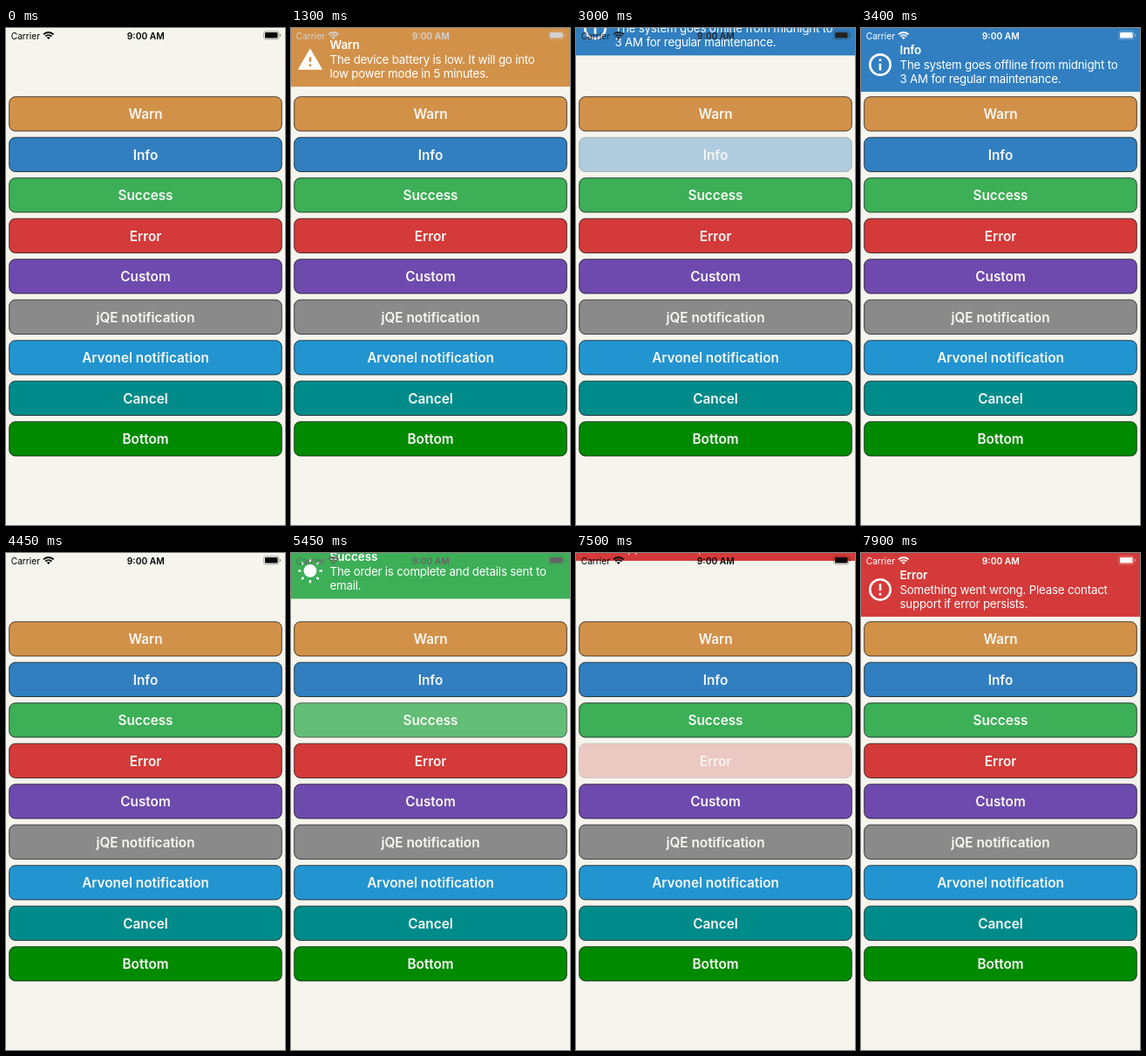
An HTML page with a canvas that plays this animation: 320 by 569 pixels, repeating every 8 s.

```html
<!DOCTYPE html>
<html lang="en">
<head>
<meta charset="utf-8">
<title>Dropdown alerts</title>
<style>
  html, body { margin: 0; width: 100%; height: 100%; overflow: hidden; background: #f5f5ee; }
  canvas { display: block; width: 320px; height: 569px; }
</style>
</head>
<body>
<canvas id="stage"></canvas>
<script>
const W = 320, H = 569, LOOP = 8000, BANNER_H = 73;
const BG = '#f5f5ee', FONT = 'Inter, "Liberation Sans", sans-serif';
const canvas = document.getElementById('stage');
const dpr = window.devicePixelRatio || 1;
canvas.width = W * dpr;
canvas.height = H * dpr;
const ctx = canvas.getContext('2d');

const buttons = [
  ['Warn', '#d29149'], ['Info', '#317fc0'], ['Success', '#3caf57'],
  ['Error', '#d33a39'], ['Custom', '#6e4aae'], ['jQE notification', '#8a8a8a'],
  ['Arvonel notification', '#2294d0'], ['Cancel', '#008b8b'], ['Bottom', '#008a00']
];

// Each alert belongs to the button with the same index; times in ms.
const alerts = [
  { press: 925, pressTime: 150, release: 1055, open: 1055, close: 2110, icon: warnIcon,
    lines: ['The device battery is low. It will go into', 'low power mode in 5 minutes.'] },
  { press: 2790, pressTime: 0, release: 2924, open: 2908, close: 4025, icon: infoIcon,
    lines: ['The system goes offline from midnight to', '3 AM for regular maintenance.'] },
  { press: 5140, pressTime: 0, release: 5290, open: 5295, close: 6150, icon: sunIcon,
    lines: ['The order is complete and details sent to', 'email.'] },
  { press: 7290, pressTime: 0, release: 7462, open: 7462, close: Infinity, icon: errorIcon,
    lines: ['Something went wrong. Please contact', 'support if error persists.'] }
];

const clamp = x => Math.max(0, Math.min(1, x));
const easeQuad = x => {
  x = clamp(x);
  return x < 0.5 ? 2 * x * x : 1 - 2 * (1 - x) ** 2;
};

// Damped spring from 0 to 1: stiffness 230.2, damping 28, mass 1.
function spring(ms) {
  if (ms <= 0) return 0;
  if (ms > 800) return 1;
  const t = ms / 1000, decay = 14, w = Math.sqrt(230.2 - decay * decay);
  return 1 - Math.exp(-decay * t) * (Math.cos(w * t) + decay / w * Math.sin(w * t));
}

function buttonOpacity(alert, t) {
  if (!alert || t < alert.press) return 1;
  const pressed = time => 1 - 0.8 * (alert.pressTime ? easeQuad((time - alert.press) / alert.pressTime) : 1);
  if (t < alert.release) return pressed(t);
  const from = pressed(alert.release);
  return from + (1 - from) * easeQuad((t - alert.release) / 250);
}

function text(str, x, y, size, weight, color, align = 'left', spacing = 0) {
  ctx.font = `${weight} ${size}px ${FONT}`;
  ctx.letterSpacing = spacing + 'px';
  ctx.textAlign = align;
  ctx.fillStyle = color;
  ctx.fillText(str, x, y);
}

function roundRect(x, y, w, h, r) {
  ctx.beginPath();
  ctx.roundRect(x, y, w, h, r);
}

function disc(x, y, r) {
  ctx.beginPath();
  ctx.arc(x, y, r, 0, Math.PI * 2);
}

function line(x1, y1, x2, y2) {
  ctx.beginPath();
  ctx.moveTo(x1, y1);
  ctx.lineTo(x2, y2);
  ctx.stroke();
}

function drawButton(i, t) {
  const [label, color] = buttons[i];
  const y = 78.4 + i * 46.5;
  roundRect(3.7, y + 0.3, 312.6, 39.3, 7);
  ctx.fillStyle = color;
  ctx.fill();
  ctx.strokeStyle = 'rgba(0,0,0,.85)';
  ctx.lineWidth = 0.8;
  ctx.stroke();
  text(label, 160, y + 25.8, 15.3, 600, '#f8f8f5', 'center');
  const opacity = buttonOpacity(alerts[i], t);
  if (opacity < 1) {
    ctx.globalAlpha = 1 - opacity;
    ctx.fillStyle = BG;
    ctx.fillRect(2, y - 1, 316, 42);
    ctx.globalAlpha = 1;
  }
}

function warnIcon(color) {
  ctx.beginPath();
  ctx.moveTo(22, 29);
  ctx.lineTo(36.2, 53.6);
  ctx.lineTo(7.8, 53.6);
  ctx.fill();
  ctx.fillStyle = color;
  ctx.fillRect(20.7, 39.2, 2.6, 5.4);
  ctx.fillRect(20.7, 47.2, 2.6, 2.6);
}

function ringIcon(barTop, dotTop, barLength) {
  ctx.lineWidth = 2.6;
  disc(22, 42, 11.7);
  ctx.stroke();
  ctx.fillRect(20.7, barTop, 2.6, barLength);
  ctx.fillRect(20.7, dotTop, 2.6, 2.6);
}

function infoIcon() { ringIcon(40.6, 35.4, 7.8); }
function errorIcon() { ringIcon(35.4, 45.9, 7.8); }

function sunIcon() {
  disc(22, 41, 7.4);
  ctx.fill();
  ctx.lineWidth = 2.4;
  ctx.lineCap = 'round';
  for (let i = 0; i < 8; i++) {
    const c = Math.cos(i * Math.PI / 4), s = Math.sin(i * Math.PI / 4);
    line(22 + c * 11.6, 41 + s * 11.6, 22 + c * 12.8, 41 + s * 12.8);
  }
}

function drawBanner(i, t) {
  const alert = alerts[i];
  const shown = spring(t - alert.open) - spring(t - alert.close);
  if (shown < 0.002) return;
  const [title, color] = buttons[i];
  ctx.save();
  ctx.translate(0, -BANNER_H * (1 - shown));
  ctx.fillStyle = color;
  ctx.fillRect(0, -4, W, BANNER_H + 4);
  ctx.fillStyle = ctx.strokeStyle = '#fff';
  alert.icon(color);
  text(title, 44.5, 30, 13.5, 600, '#fff', 'left', -0.1);
  alert.lines.forEach((str, n) => text(str, 44.5, 46.7 + n * 16.3, 13.3, 400, '#fff', 'left', -0.2));
  ctx.restore();
}

function drawStatusBar(t) {
  const light = alerts.reduce((sum, a) =>
    sum + easeQuad((t - a.open) / 350) - easeQuad((t - a.close) / 350), 0);
  const v = Math.round(255 * clamp(light));
  const color = `rgb(${v},${v},${v})`;
  text('Carrier', 5.7, 12.6, 10.2, 400, color);
  text('9:00 AM', 160.3, 12.6, 10.3, 600, color, 'center');

  ctx.strokeStyle = color;
  ctx.lineCap = 'butt';
  ctx.lineWidth = 1.9;
  for (const r of [4.9, 8]) {
    ctx.beginPath();
    ctx.arc(48.8, 13, r, -Math.PI * 0.755, -Math.PI * 0.245);
    ctx.stroke();
  }
  ctx.beginPath();
  ctx.moveTo(48.8, 13);
  ctx.arc(48.8, 13, 2.8, -Math.PI * 0.755, -Math.PI * 0.245);
  ctx.fill();

  roundRect(297, 5, 14.6, 6.6, 1.4);
  ctx.fill();
  ctx.globalAlpha = 0.4;
  ctx.lineWidth = 0.8;
  roundRect(295.6, 3.7, 17.4, 9.2, 2.5);
  ctx.stroke();
  ctx.beginPath();
  ctx.arc(313.9, 8.3, 1.5, -Math.PI / 2, Math.PI / 2);
  ctx.fill();
  ctx.globalAlpha = 1;
}

function draw(t) {
  ctx.setTransform(dpr, 0, 0, dpr, 0, 0);
  ctx.fillStyle = BG;
  ctx.fillRect(0, 0, W, H);
  buttons.forEach((_, i) => drawButton(i, t));
  alerts.forEach((_, i) => drawBanner(i, t));
  drawStatusBar(t);
}

const start = performance.now();
function tick() {
  draw((performance.now() - start) % LOOP);
  requestAnimationFrame(tick);
}
tick();
</script>
</body>
</html>
```
